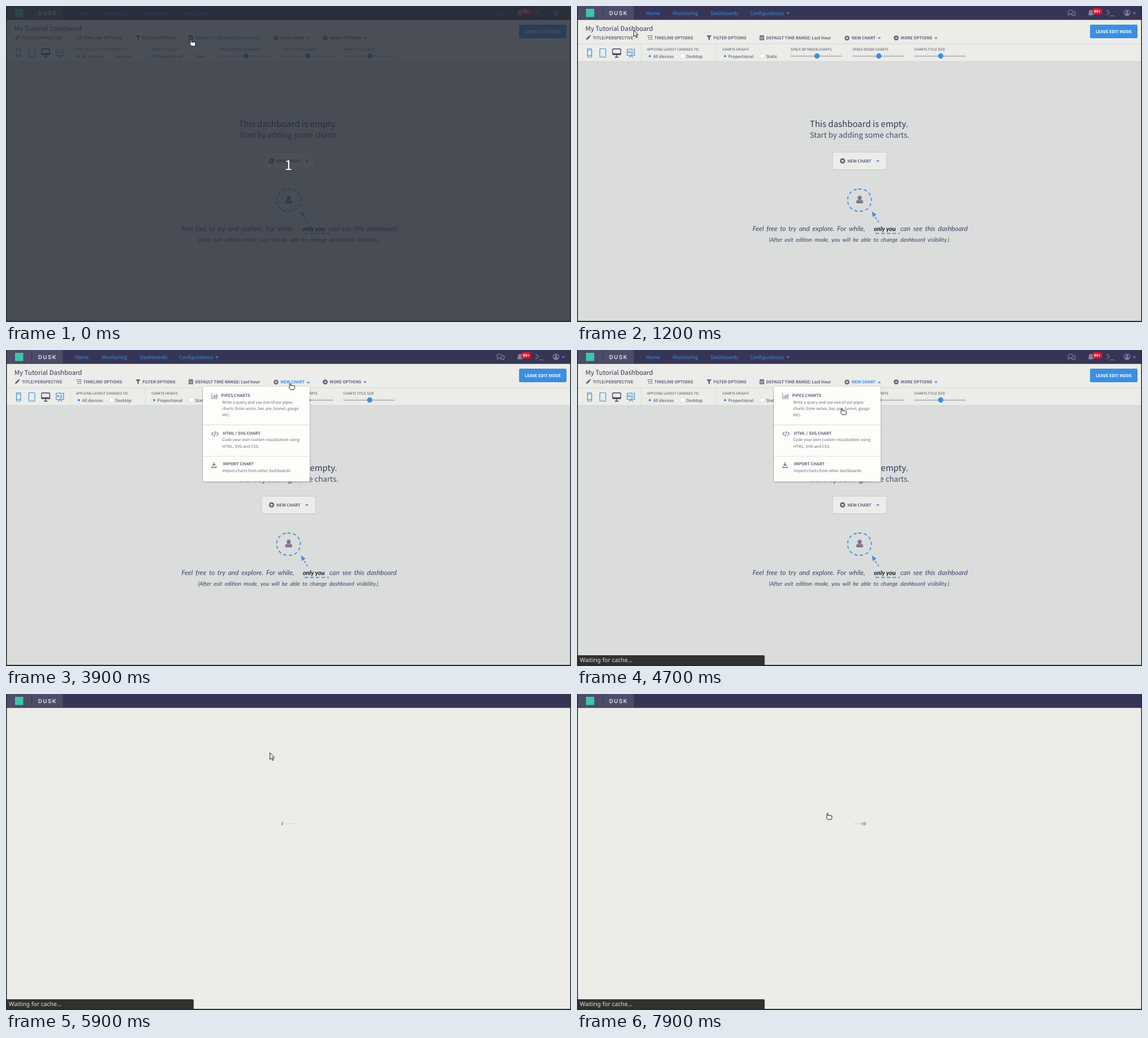
Recreate the animation shown at these times as an HTML page. Size 1001 px wide and 559 px high, loop 8 s.

```html
<!DOCTYPE html>
<html lang="en">
<head>
<meta charset="utf-8">
<title>Dashboard tutorial</title>
<style>
html, body { margin: 0; width: 100%; height: 100%; overflow: hidden; background: #282828; }
svg { display: block; width: 1001px; height: 559px; }
text {
  font-family: "Noto Sans CJK JP", "Noto Sans CJK SC", "Noto Sans", sans-serif;
  text-rendering: geometricPrecision;
  white-space: pre;
}
.nav { font-size: 8.8px; fill: #3f8de0; }
.tool { font-size: 7.3px; font-weight: 700; fill: #625f7c; }
.label { font-size: 6.15px; fill: #4b4866; }
.opt { font-size: 7.55px; fill: #4b4866; }
.desc { font-size: 7.03px; fill: #6c6984; }
.hand text { font: italic 12px Lato, sans-serif; word-spacing: 2px; fill: #46426a; }
.hand .strong { font-size: 11px; font-weight: 700; word-spacing: 0; fill: #151320; }
.hand .small { font-size: 10.1px; }
.blue { fill: #3b8ee2; }
.icon { fill: #625f7c; }
.line { fill: none; stroke: #7a778f; }
.bline { fill: none; stroke: #3b8ee2; }

/* 8000 ms loop: 1.25% is one 100 ms tick */
.anim { animation: 8s step-end -10ms infinite; }
#intro { animation-name: intro; }
#range { animation-name: range; }
#filter { animation-name: filter; }
#newChart { animation-name: newChart; }
#menu { animation-name: menu; }
#caretDown { animation-name: caretDown; }
#loading { animation-name: loading; }
#status { animation-name: status; }
#pointer { animation-name: move; }
#arrow { animation-name: arrow; }
#finger { animation-name: finger; }
#wave { animation-name: wave; }

@keyframes intro { 0% { opacity: 1 } 2.5%, 100% { opacity: 0 } }
@keyframes range { 0% { fill: #3b8ee2 } 6.25%, 100% { fill: #625f7c } }
@keyframes filter { 0% { fill: #625f7c } 6.25% { fill: #3b8ee2 } 8.75%, 100% { fill: #625f7c } }
@keyframes newChart { 0% { fill: #625f7c } 31.25%, 100% { fill: #3b8ee2 } }
@keyframes menu { 0% { opacity: 0 } 41.25% { opacity: .5 } 42.5%, 100% { opacity: 1 } }
@keyframes caretDown { 0% { transform: none } 41.25%, 100% { transform: scaleY(-1) } }
@keyframes loading { 0% { opacity: 0 } 73.75%, 100% { opacity: 1 } }
@keyframes status { 0% { opacity: 0 } 58.75%, 100% { opacity: 1 } }
@keyframes arrow {
  0% { opacity: 0 } 8.75% { opacity: 1 } 31.25% { opacity: 0 }
  68.75% { opacity: 1 } 96.25%, 100% { opacity: 0 }
}
@keyframes finger {
  0% { opacity: 1 } 8.75% { opacity: 0 } 31.25% { opacity: 1 }
  68.75% { opacity: 0 } 96.25%, 100% { opacity: 1 }
}
@keyframes move {
  0% { transform: translate(325px, 59px) }
  6.25% { transform: translate(299px, 59px) }
  8.75% { transform: translate(116px, 35px) }
  10% { transform: translate(116px, 35px); animation-timing-function: steps(4) }
  15% { transform: translate(100px, 42px) }
  17.5% { transform: translate(100px, 42px); animation-timing-function: steps(8) }
  27.5% { transform: translate(491px, 39px) }
  28.75% { transform: translate(501px, 45px); animation-timing-function: steps(4) }
  33.75% { transform: translate(503px, 56px) }
  48.75% { transform: translate(500.7px, 58px) }
  50% { transform: translate(500.7px, 58px); animation-timing-function: steps(4) }
  55% { transform: translate(467px, 99px) }
  56.25% { transform: translate(467px, 99px); animation-timing-function: steps(3) }
  60% { transform: translate(466px, 104px) }
  68.75% { transform: translate(467px, 103.5px) }
  88.75% { transform: translate(467px, 103.5px); animation-timing-function: steps(4) }
  93.75% { transform: translate(451px, 130px); animation-timing-function: steps(4) }
  98.75%, 100% { transform: translate(441px, 210px) }
}
@keyframes wave {
  0% { transform: none }
  73.75% { transform: none; animation-timing-function: steps(20) }
  98.75%, 100% { transform: translateX(81px) }
}
</style>
</head>
<body>
<svg viewBox="0 0 1001 559" xmlns="http://www.w3.org/2000/svg">
  <defs>
    <path id="caret" d="M-3 -1.5H3L0 1.7z"/>
    <g id="plus">
      <circle r="4.7"/>
      <path d="M-2.6 0H2.6M0 -2.6V2.6" stroke="#ecede8" stroke-width="1.4"/>
    </g>
    <circle id="radio" r="4.3" fill="#fff" stroke="#cfd1d1" stroke-width=".8"/>
    <g id="radioOn"><use href="#radio"/><circle r="2.2" class="blue"/></g>
    <g id="slider">
      <path d="M1 83v3M23.5 83v3M46.5 83v3M69 83v3M90 83v3" stroke="#c9cbcc" stroke-width=".8"/>
      <path d="M0 88.7H91" stroke="#bdc0c4" stroke-width="2.4"/>
      <circle cx="46.7" cy="88.5" r="4.7" class="blue"/>
    </g>
    <g id="pulse" fill="#a9aba9">
      <rect x="0" y="226.5" width="2.7" height="6"/>
      <rect x="-3" y="226.5" width="2.7" height="6" opacity=".75"/>
      <rect x="-6" y="227" width="2.7" height="5" opacity=".45"/>
    </g>
    <clipPath id="cells"><rect x="488" y="225" width="24.5" height="9"/></clipPath>
    <filter id="shadow" x="-10%" y="-10%" width="120%" height="120%">
      <feDropShadow dx="0" dy="1" stdDeviation="1.5" flood-opacity=".35"/>
    </filter>
  </defs>

  <!-- page -->
  <rect width="1001" height="559" fill="#dadddc"/>
  <rect y="24" width="1001" height="74" fill="#ecede8"/>
  <path d="M0 67H1001M0 98H1001" stroke="#d6d8d5"/>
  <rect width="1001" height="24" fill="#373555"/>

  <g class="nav">
    <text x="122" y="15.5">Home</text>
    <text x="169.5" y="15.5">Monitoring</text>
    <text x="237" y="15.5">Dashboards</text>
    <text x="306.5" y="15.5">Configurations</text>
    <use href="#caret" x="373.5" y="13"/>
    <use href="#caret" x="987.5" y="13"/>
  </g>
  <g fill="none" stroke="#85849d" stroke-width="1.2">
    <path d="M873 14.5l-2 1.500v-3q-1-1-1-2.500q0-3 4.500-3t4.500 3t-4.500 3z"/>
    <path d="M880.5 9q2.500 1 2.500 3.500q0 1.500-1 2.500v2.500l-2.500-1.500q-3 .3-4.500-1"/>
    <path d="M938.5 7l5 4.500l-5 4.500M944 17.5h8"/>
    <circle cx="974.5" cy="12" r="5.2"/>
  </g>
  <g fill="#85849d">
    <path d="M905 16q2-2 2-5q0-4 3.500-4t3.500 4q0 3 2 5zM908.5 16.800h4q-2 2.500-4 0"/>
    <circle cx="974.5" cy="10.3" r="2"/>
    <path d="M971 15.5q0-3 3.500-3t3.500 3q-3.500 2.500-7 0"/>
  </g>
  <rect x="913" y="4" width="17" height="11" rx="3" fill="#e0142c"/>
  <text x="921.5" y="12" text-anchor="middle" font-size="6.8" font-weight="700" fill="#fff">99+</text>

  <!-- edit toolbar -->
  <text x="15" y="43.6" font-size="11.4" fill="#37345a">My Tutorial Dashboard</text>
  <rect x="909" y="33" width="84" height="24" rx="2" fill="#3b8ee2"/>
  <text x="951" y="48" class="tool" style="fill:#fff" text-anchor="middle">LEAVE EDIT MODE</text>
  <g class="tool">
    <text x="28" y="58.9">TITLE/PERSPECTIVE</text>
    <text x="137" y="58.9">TIMELINE OPTIONS</text>
    <text x="241.5" y="58.9" id="filter" class="anim">FILTER OPTIONS</text>
    <text x="335" y="58.9" id="range" class="anim">DEFAULT TIME RANGE: Last hour</text>
    <text x="486.5" y="58.9" id="newChart" class="anim">NEW CHART</text>
    <text x="573.5" y="58.9">MORE OPTIONS</text>
  </g>
  <g class="icon">
    <path d="M16 60l.7-2.800 4.800-4.800 2.100 2.100-4.800 4.800zM22 51.900l.9-.8 2 2-.8.9z"/>
    <path d="M125 52h2v1.500h-2zM128 52h6v1h-6zM126 55h2v1.500h-2zM129 55h5v1h-5zM127 58h2v1.500h-2zM130 58h4v1h-4z"/>
    <path d="M229.5 52h9l-3.400 4v4.800l-2.200-1.600v-3.200z"/>
    <path d="M323.5 52.5h8v8h-8zM325 51h1.200v2h-1.200zM328.8 51h1.200v2h-1.200z"/>
    <use href="#plus" transform="translate(478.5 56.7) scale(.9)"/>
  </g>
  <g fill="none" stroke="#625f7c">
    <circle cx="565.5" cy="56.5" r="2.6" stroke-width="2.2"/>
    <circle cx="565.5" cy="56.5" r="4" stroke-width="1.4" stroke-dasharray="1.7 1.44"/>
  </g>
  <path d="M324 55h7M324 57.3h7M326 54.5v5.5M328.8 54.5v5.5" stroke="#ecede8" stroke-width=".6"/>
  <g transform="translate(535.5 57)"><use href="#caret" class="blue anim" id="caretDown"/></g>
  <use href="#caret" x="636" y="57" class="blue"/>

  <!-- layout row -->
  <g class="bline" stroke-width="1.2">
    <rect x="18.5" y="75.5" width="7.5" height="15" rx="1.3"/>
    <path d="M18.5 78h7.500M18.5 87.5h7.500"/>
    <rect x="40.5" y="75.5" width="10.5" height="15" rx="1.3"/>
    <path d="M45 88.5h1.500M88 76.5h15M89 76.5v11h13v-11M92 91l3.500-3.500l3.500 3.500M95.5 75v1.500M95 80h5M95 82.5h5M95 85h5"/>
    <circle cx="92.2" cy="81.5" r="1.2"/>
  </g>
  <g fill="none" stroke="#37345a" stroke-width="1.3">
    <rect x="63" y="76" width="14.5" height="10" rx="1"/>
    <path d="M63 84.5h14.500M67 90.5h6.500M70.2 86v4.500"/>
  </g>
  <path d="M113.5 68v10l4 5l-4 5v10M246 68v10l4 5l-4 5v10" fill="none" stroke="#d8dad6"/>
  <g class="label">
    <text x="124" y="79">APPLYING LAYOUT CHANGES TO:</text>
    <text x="257.5" y="79">CHARTS HEIGHT:</text>
    <text x="378.5" y="78.6">SPACE BETWEEN CHARTS</text>
    <text x="488" y="78.6">SPACE INSIDE CHARTS</text>
    <text x="597.5" y="78.6">CHARTS TITLE SIZE</text>
  </g>
  <g class="opt">
    <text x="135" y="91.5">All devices</text>
    <text x="193.5" y="91.5">Desktop</text>
    <text x="268" y="91.5">Proportional</text>
    <text x="335" y="91.5">Static</text>
  </g>
  <use href="#radioOn" x="129" y="88.8"/>
  <use href="#radio" x="187" y="88.8"/>
  <use href="#radioOn" x="262.5" y="88.8"/>
  <use href="#radio" x="328.5" y="88.8"/>
  <use href="#slider" x="378.5"/>
  <use href="#slider" x="488"/>
  <use href="#slider" x="597.7"/>

  <!-- empty state -->
  <text x="412.5" y="213.5" font-size="15" font-weight="500" fill="#37345a">This dashboard is empty.</text>
  <text x="412.5" y="233" font-size="13.3" font-weight="300" fill="#4d4a69">Start by adding some charts.</text>
  <rect x="452.5" y="258.5" width="96" height="31" rx="1.5" fill="#ecede8" stroke="#c6c8c8"/>
  <use href="#plus" x="470.5" y="274" class="icon"/>
  <text x="479" y="276.9" class="tool">NEW CHART</text>
  <use href="#caret" x="533" y="274.5" class="blue"/>

  <rect x="479.5" y="324" width="42" height="39" rx="19" class="bline" stroke-width="1.8" stroke-dasharray="5.5 4.5"/>
  <g fill="#7a778f">
    <ellipse cx="500.8" cy="339.5" rx="3.5" ry="4"/>
    <path d="M494.8 349v-3q0-2.500 3-3q3 2 6 0q3 .5 3 3v3z"/>
  </g>
  <path d="M534.5 382.5L527 371.5" class="bline" stroke-width="1.8" stroke-dasharray="4 3"/>
  <path d="M522.5 363.5l8 5.200l-6.300 4.800z" class="blue"/>
  <path d="M529 402.3h43" class="bline" stroke-width="1.7" stroke-dasharray="6 4"/>
  <g class="hand">
    <text x="311" y="398">Feel free to try and explore. For while,</text>
    <text x="526" y="398" class="strong">only you</text>
    <text x="573" y="398">can see this dashboard</text>
    <text x="500" y="416.5" text-anchor="middle" class="small">(After exit edition mode, you will be able to change dashboard visibility.)</text>
  </g>

  <!-- chart menu -->
  <g id="menu" class="anim">
    <rect x="349" y="65" width="189" height="167.5" rx="1" fill="#fdfdfa" filter="url(#shadow)"/>
    <path d="M349 132.5h189M349 188h189" stroke="#dcdddd"/>
    <g class="tool">
      <text x="381" y="82.8">PIPES CHARTS</text>
      <text x="384" y="149.6">HTML / SVG CHART</text>
      <text x="384" y="204.3">IMPORT CHART</text>
    </g>
    <g class="desc">
      <text x="383" y="94.5">Write a query and use one of our pipes</text>
      <text x="383" y="106">charts (time series, bar, pie, funnel, gauge</text>
      <text x="383" y="117.2">etc).</text>
      <text x="383" y="161.3">Code your own custom visualization using</text>
      <text x="383" y="172.5">HTML, SVG and CSS.</text>
      <text x="383" y="216">Import charts from other dashboards</text>
    </g>
    <g class="line" stroke-width="1.2">
      <path d="M364.5 76v10h10" stroke-width=".9"/>
      <path d="M367 84.5v-3M369.3 84.5v-6M371.6 84.5v-4.500M373.7 84.5v-7"/>
      <path d="M367.5 145l-3 3.300l3 3.300M373 145l3 3.300l-3 3.300M371.3 143.5l-2.200 9.500"/>
      <path d="M364.8 205v3h7.400v-3M368.5 198.5v4" stroke-width="1.5"/>
    </g>
    <path d="M365.3 202h6.400l-3.200 3.700z" fill="#7a778f"/>
  </g>

  <!-- loading page -->
  <g id="loading" class="anim">
    <rect y="24" width="1001" height="535" fill="#ecede8"/>
    <rect width="1001" height="24" fill="#373555"/>
    <path d="M488.5 229.5h24" stroke="#c9cbc8" stroke-dasharray="2 1"/>
    <g clip-path="url(#cells)">
      <g id="wave" class="anim">
        <use href="#pulse" x="488"/>
        <use href="#pulse" x="458"/>
        <use href="#pulse" x="428"/>
      </g>
    </g>
  </g>

  <!-- brand block -->
  <rect x="1" width="99.5" height="24" fill="#4d4c69"/>
  <path d="M45.5 0v24" stroke="#3a3858"/>
  <path d="M1 24h999" stroke="#2c2a47"/>
  <rect x="16" y="5" width="14.5" height="14.5" fill="#3cc8a8"/>
  <text x="57" y="15.9" fill="#fff" style="font:500 9.6px Inter, sans-serif;letter-spacing:1.6px">DUSK</text>

  <g id="status" class="anim">
    <path d="M1 540h329.500q2 0 2 2V557H1z" fill="#30322f"/>
    <text x="5" y="552" fill="#e4e5e2" style="font:10.4px 'Noto Sans', sans-serif">Waiting for cache...</text>
  </g>
  <path d="M.75 0V559M1000.25 0V559" stroke="#282a2a" stroke-width="1.5"/>
  <rect y="557" width="1001" height="2" fill="#282a2a"/>

  <g id="intro" class="anim">
    <rect x="1" width="999" height="557.5" fill="#272c37" opacity=".82"/>
    <text x="500.5" y="289.5" text-anchor="middle" font-size="24" fill="#fff">1</text>
  </g>

  <g id="pointer" class="anim" fill="#fff" stroke="#111" stroke-linejoin="round">
    <path id="arrow" class="anim" d="M.6 .6V12L3.3 9.6L5.3 14L7 13.2L5.1 9H8.5z"/>
    <path id="finger" class="anim" d="M1.8 1.6q1-1.500 2 0V5H9q1.700.2 1.700 2V9.5L9.5 12H3.8L1 9Q.2 7.2 1.8 7z"/>
  </g>
</svg>
</body>
</html>
```
